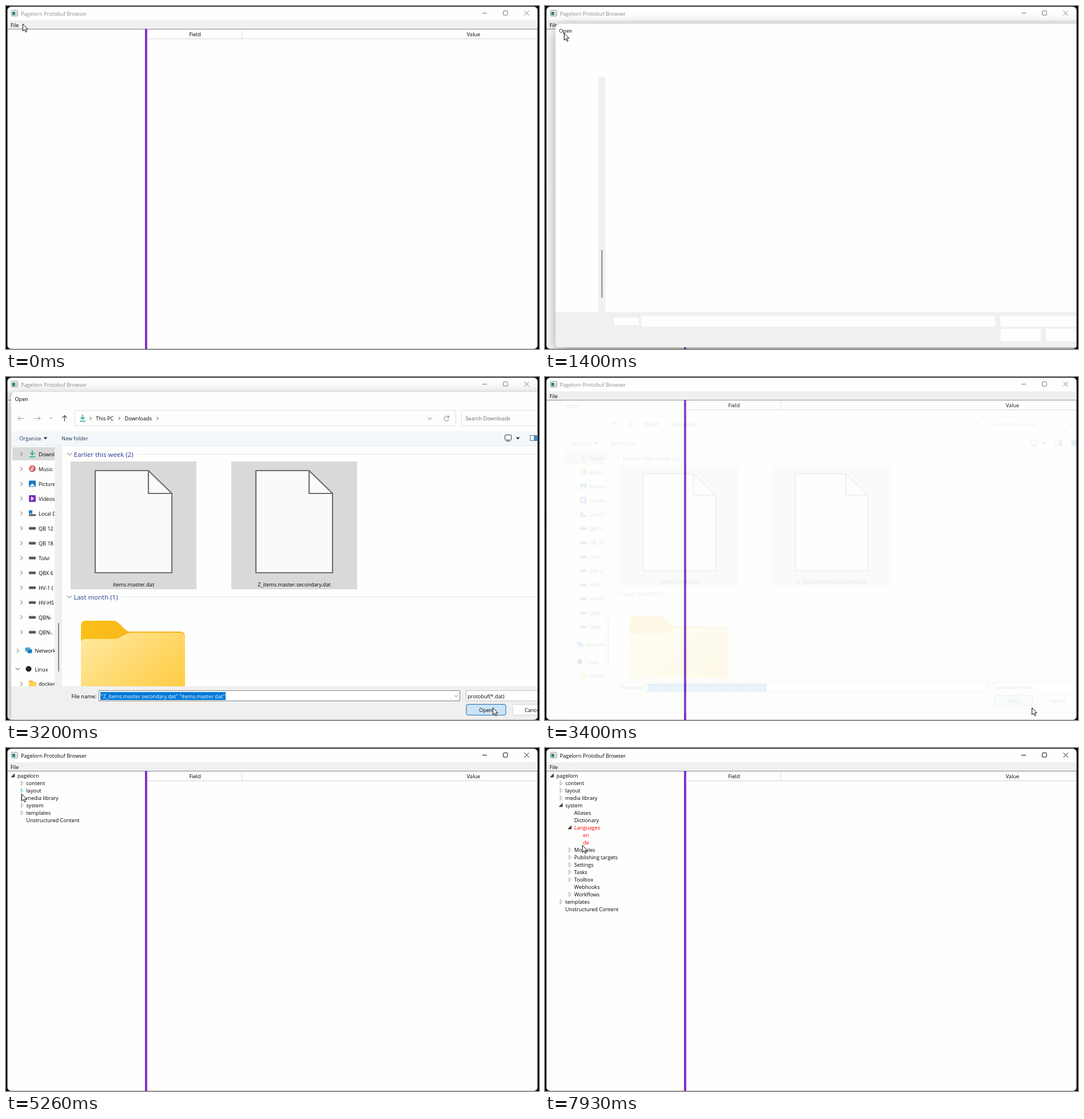
An HTML page with a canvas that plays this animation: 932 px wide and 601 px high, repeating every 8000 ms.

```html
<!DOCTYPE html>
<html lang="en">
<head>
<meta charset="utf-8">
<title>Protobuf Browser</title>
<style>
html, body { margin: 0; width: 932px; height: 601px; overflow: hidden; background: #000; }
canvas { display: block; }
</style>
</head>
<body>
<canvas id="stage" width="932" height="601"></canvas>
<script>
const FPS = 15, TICKS = 120;
const WHITE = '#fefefd', PANEL = '#f0f0f0';
const screen2d = document.getElementById('stage').getContext('2d');
const dialogCanvas = Object.assign(document.createElement('canvas'), { width: 980, height: 620 });
const dialog2d = dialogCanvas.getContext('2d');
let g = screen2d;

// Drawing helpers
function text(str, x, y, { color = '#000', size = 9.15, align = 'left' } = {}) {
  g.font = `${size}px "Open Sans", "Noto Sans", sans-serif`;
  g.textAlign = align;
  g.fillStyle = color;
  g.fillText(str, x, y);
}
function rect(x, y, w, h, fill) {
  g.fillStyle = fill;
  g.fillRect(x, y, w, h);
}
function paint(shape, fill, stroke, width = 1) {
  if (fill) { g.fillStyle = fill; g.fill(shape); }
  if (stroke) { g.strokeStyle = stroke; g.lineWidth = width; g.stroke(shape); }
}
const path = (d, fill, stroke, width) => paint(new Path2D(d), fill, stroke, width);
function box(x, y, w, h, r, fill, stroke) {
  const shape = new Path2D();
  shape.roundRect(x, y, w, h, r);
  paint(shape, fill, stroke);
}
function circle(x, y, r, fill, stroke) {
  const shape = new Path2D();
  shape.arc(x, y, r, 0, 7);
  paint(shape, fill, stroke);
}
function clipped(x, y, w, h, r, draw) {
  g.save();
  g.beginPath();
  g.roundRect(x, y, w, h, r);
  g.clip();
  draw();
  g.restore();
}
function gradient(x0, y0, x1, y1, from, to) {
  const fill = g.createLinearGradient(x0, y0, x1, y1);
  fill.addColorStop(0, from);
  fill.addColorStop(1, to);
  return fill;
}
const chevronRight = (x, y, s = 3.5, color = '#555') =>
  path(`M${x - s / 2} ${y - s}l${s} ${s}l${-s} ${s}`, null, color);
const chevronDown = (x, y, s = 3.5, color = '#666') =>
  path(`M${x - s} ${y - s / 2}l${s} ${s}l${s} ${-s}`, null, color);
const caret = (x, y) => path(`M${x - 3.5} ${y - 1.5}h7l-3.5 4z`, '#333');

// Pointer position: [tick, x, y]
const pointerKeys = [
  [0, 29, 31], [4, 16, 30], [8, 16, 30], [18, 33, 47], [22, 33, 47],
  [25, 230, 262], [27, 230, 262], [29, 480, 300], [31, 650, 497], [39, 845, 577],
  [43, 851, 579], [53, 851, 579], [64, 12, 48], [68, 12, 48], [79, 27, 80],
  [86, 28, 102], [96, 28, 102], [107, 43, 140], [113, 43, 140], [119, 65, 170]
];
function pointerAt(tick) {
  const i = Math.max(1, pointerKeys.findIndex(key => key[0] >= tick));
  const [t0, x0, y0] = pointerKeys[i - 1], [t1, x1, y1] = pointerKeys[i];
  const p = (tick - t0) / (t1 - t0), e = p * p * (3 - 2 * p);
  return { x: Math.round(x0 + (x1 - x0) * e), y: Math.round(y0 + (y1 - y0) * e) };
}
function drawPointer({ x, y }) {
  path(`M${x + .5} ${y + .5}v12.4l2.9-2.7l1.9 4.6l2-.9l-1.9-4.3h3.7z`, '#fff', '#111');
}

// Tree: opensAt is the tick at which a branch unfolds; leaves have none
const node = (name, opensAt, kids = [], color = '#000') => ({ name, opensAt, kids, color });
const leaf = (name, color) => node(name, undefined, [], color);
const shut = name => node(name, Infinity);
const tree = node('pagelorn', 66, [
  shut('content'), shut('layout'), shut('media library'),
  node('system', 92, [
    leaf('Aliases'), leaf('Dictionary'),
    node('Languages', 108, [leaf('en', 'red'), leaf('de', 'red')], 'red'),
    shut('Modules'), shut('Publishing targets'), shut('Settings'), shut('Tasks'),
    shut('Toolbox'), leaf('Webhooks'), shut('Workflows')
  ]),
  shut('templates'), leaf('Unstructured Content')
]);
function drawTree(item, tick, pointer, depth = 0, row = 0) {
  const x = 12 + 15.5 * depth, y = 48.5 + 13 * row;
  const open = tick >= item.opensAt;
  const hover = Math.floor((pointer.y - 42) / 13) === row && Math.abs(pointer.x - x) < 7;
  if (open) path(`M${x - 3} ${y + 2.5}h6v-6z`, hover ? '#82dffb' : '#444', hover ? '#1cc4f7' : '#262626', .6);
  else if (item.opensAt) path(`M${x - 1} ${y - 3.8}l3.6 3.8l-3.6 3.8z`, '#fff', hover ? '#27b7e7' : '#999', .9);
  text(item.name, x + 8, y + 3.5, { color: item.color });
  row++;
  if (open) for (const kid of item.kids) row = drawTree(kid, tick, pointer, depth + 1, row);
  return row;
}

function drawWindow(tick, pointer) {
  rect(2, 0, 928, 601, WHITE);
  const active = tick >= 52;
  const ink = active ? '#000' : '#8c8c8c', buttonInk = active ? '#111' : '#777';
  box(9.5, 7.5, 11, 10, 1, '#f4f6f6', '#8a9094');
  rect(11, 10, 5, 6, '#2f8580');
  rect(17, 10, 2, 6, '#c9cdd0');
  text('Pagelorn Protobuf Browser', 26, 16.5, { color: ink });
  path('M833 12.5h8', null, buttonInk);
  box(869.5, 8.5, 7.5, 7.5, 1, null, buttonInk);
  path('M906.5 8.5l8 8m0-8l-8 8', null, buttonInk);

  rect(2, 25, 928, 15, PANEL);
  const menuOpen = tick >= 6 && tick < 19;
  if (menuOpen || (tick >= 2 && tick < 6)) box(3.5, 25.5, 23, 14, 0, '#c4e1f0', '#26a0da');
  text('File', 8, 36.5);
  rect(2, 40, 928, 1, '#828790');

  rect(243, 40, 4, 561, '#8a2be2');
  rect(243, 40, 1, 561, '#7030b0');
  rect(246, 40, 1, 561, '#7447a8');
  rect(248, 57, 680, 1, '#d3d3e2');
  rect(412, 42, 1, 15, '#dcdce2');
  rect(928, 41, 1, 560, '#c8cacd');
  text('Field', 330.5, 53, { align: 'center' });
  text('Value', 817.5, 53, { align: 'center' });

  if (tick >= 54) drawTree(tree, tick, pointer);
  if (menuOpen) {
    box(3.5, 40.5, 84, 22, 0, PANEL, '#999');
    if (pointer.y > 41) box(5.5, 42.5, 80, 18, 0, '#cfe6f2', '#26a0da');
    text('Open', 32, 55);
  }
}

// Dialog parts
function downloadIcon(x, y) {
  path(`M${x} ${y - 6}v8m-3.5-3.5l3.5 3.5l3.5-3.5M${x - 5} ${y + 5.5}h10`, null, '#16a58c', 1.5);
}
const icons = {
  download: downloadIcon,
  music(x, y) {
    circle(x, y, 6, gradient(x - 5, y - 5, x + 5, y + 5, '#ef8a5b', '#b5578f'));
    path(`M${x} ${y + 2}v-5l2 1.5`, null, '#fff');
    circle(x - 1, y + 2, 1.4, '#fff');
  },
  picture(x, y) {
    box(x - 6, y - 5, 12, 11, 1.5, '#1879c9');
    path(`M${x - 5} ${y + 5}l5-5l5 5z`, '#fff');
  },
  video(x, y) {
    box(x - 6, y - 5.5, 12, 12, 1.5, '#7d32b8');
    path(`M${x - 2} ${y - 3}l5 3.5l-5 3.5z`, '#fff');
  },
  disk(x, y) {
    rect(x - 6, y - 5, 6, 6, '#1683d0');
    rect(x - 6, y + 2, 12, 3, '#555');
  },
  drive(x, y) {
    box(x - 6, y - 1.5, 12, 4.5, 1, '#555');
    rect(x - 5, y - 2, 10, 1, '#999');
  },
  network(x, y) {
    box(x - 6, y - 5, 9, 7, 1, '#3ba3d8');
    box(x - 2, y - 2, 8, 7, 1, '#1976b5', '#8fd1f0');
  },
  linux(x, y) { circle(x, y, 5, '#222'); },
  folder(x, y) {
    box(x - 6, y - 5, 7, 5, 1, '#e9a917');
    box(x - 6, y - 3, 13, 9, 1, '#ffd359');
  }
};
const places = [
  ['Downloads', 'download'], ['Music', 'music'], ['Pictures', 'picture'], ['Videos', 'video'],
  ['Local Disk', 'disk'],
  ...['QB 12', 'QB 18', 'Tolvi', 'QBX 6', 'HV-1 (', 'HV-HS', 'QBN-', 'QBN-.'].map(name => [name, 'drive'])
];
function drawPlace(name, icon, y, indent = 0, open = false) {
  if (open) chevronDown(27 - indent, y, 3.5, '#222');
  else chevronRight(27 - indent, y + .5);
  icons[icon](46 - indent, y);
  text(name, 57 - indent, y + 4);
}
function drawSidebar() {
  rect(11, 123, 74, 23, '#d9d9d9');
  clipped(10, 121, 75, 421, 0, () => {
    places.forEach(([name, icon], i) => drawPlace(name, icon, 134.5 + 26 * i));
    drawPlace('Network', 'network', 479, 6.5);
    drawPlace('Linux', 'linux', 511.5, 6.5, true);
    drawPlace('docker-desktop', 'folder', 537);
  });
}
function drawGroup(name, y, lineX) {
  chevronDown(111, y, 4);
  text(name, 118.5, y + 4.5, { color: '#1e3c91', size: 11.5 });
  rect(lineX, y, 980, 1, '#e4e4ea');
}
function drawFile(name, x, fill, border) {
  if (fill) box(x + .5, 148.5, 219, 223, 0, fill, border || fill);
  path(`M${x + 43} 164h93l41 40v139h-134z`, '#fafafa', '#6f6f6b', 2.2);
  path(`M${x + 136} 164v40h41`, null, '#6f6f6b', 2.2);
  text(name, x + 110, 367, { align: 'center' });
}
function drawFolder() {
  clipped(100, 400, 700, 142, 0, () => {
    path('M131 560V436q0-9 9-9h46q7 0 12 5l10 10q4 4 9 4h87q9 0 9 9v105z',
      gradient(131, 427, 313, 470, '#fcbf18', '#f3b01c'));
    path('M131 560V466q0-7 7-7h50q8 0 13-4l8-4q5-3 11-3h84q9 0 9 9v103z',
      gradient(150, 450, 270, 590, '#ffe79b', '#ffca3e'));
  });
}
function drawToolbars() {
  for (const [x, dir] of [[26, -1], [55, 1]])
    path(`M${x - 5} 72.5h10M${x + 5 * dir - 4 * dir} 68.5l${4 * dir} 4l${-4 * dir} 4`, null, '#999');
  chevronDown(79, 72, 2.5, '#888');
  path('M102.5 77.5v-10m-4 4l4-4l4 4', null, '#444', 1.2);
  box(120.5, 58.5, 666, 27, 0, null, '#e0e0e0');
  downloadIcon(134, 72);
  for (const x of [148, 198, 265]) chevronRight(x, 72.5, 2.5, '#333');
  text('This PC', 157, 76);
  text('Downloads', 207.5, 76);
  chevronDown(741, 73);
  path('M774 70.5a4.3 4.3 0 1 0 .5 3.5M774.5 67.5v3.5h-3.5', null, '#777');
  box(796.5, 58.5, 160, 27, 0, null, '#e0e0e0');
  text('Search Downloads', 803.5, 76, { color: '#666' });
  circle(945, 71, 3, null, '#666');
  path('M943 73.5l-3 3', null, '#666');

  rect(9, 95, 960, 26, '#f4f7fa');
  rect(9, 120, 960, 1, '#e8ebee');
  text('Organize', 23.5, 111, { color: '#1e395b' });
  caret(69, 107);
  text('New folder', 97, 111, { color: '#1e395b' });
  box(872.5, 101.5, 11, 9, 1, '#fff', '#333');
  rect(875, 112, 6, 1, '#333');
  caret(895, 107);
  box(916.5, 102.5, 12, 9, 0, '#fff', '#55789a');
  rect(923, 103, 5, 8, '#2f8fd8');
  circle(951, 107, 6, '#1c7fd6');
}
function drawFooter(tick) {
  const names = '"Z_items.master.secondary.dat" "items.master.dat"';
  text('File name:', 158, 562.5, { align: 'right' });
  box(162.5, 549.5, 631, 18, 0, '#fff', '#858585');
  chevronDown(787, 559, 3);
  const focused = tick >= 46;
  if (tick >= 29) {
    text(names, 166, 562.5);
    if (focused) {
      rect(165, 552, g.measureText(names).width + 2, 14, '#0078d7');
      text(names, 166, 562.5, { color: '#fff' });
    }
  } else if (tick >= 27) text('items.master.dat', 166, 562.5);
  box(804.5, 549.5, 150, 18, 0, '#fff', '#c4c4c4');
  text('protobuf(*.dat)', 807, 562.5);
  const fill = focused ? '#cce4f7' : tick >= 39 ? '#e2effa' : '#fdfdfd';
  box(805, 573.5, 69, 19, 3, fill, focused ? '#1d6cae' : '#0078d4');
  text('Open', 839, 586.5, { align: 'center' });
  box(886, 573.5, 69, 19, 3, '#fdfdfd', '#d0d0d0');
  text('Cancel', 921, 586.5, { align: 'center' });
}
function drawDialog(tick) {
  g = dialog2d;
  g.clearRect(0, 0, 980, 620);
  clipped(9, 26, 957, 579, 7, () => {
    rect(9, 26, 957, 579, WHITE);
    rect(9, 542, 957, 63, PANEL);
    rect(85, 121, 13, 421, PANEL);
    rect(91, 431, 2, 85, '#858585');
    text('Open', 15.5, 41.5);
    if (tick < 23) {
      for (const [x, y, w, h] of [[114, 552, 44, 13], [162, 549, 632, 19], [804, 549, 150, 19],
        [804, 572, 72, 22], [885, 572, 72, 22]]) rect(x, y, w, h, WHITE);
      return;
    }
    drawToolbars();
    drawSidebar();
    const selected = tick >= 46 ? '#d9d9d9' : '#cce8ff';
    drawGroup('Earlier this week (2)', 135, 230);
    drawFile('items.master.dat', 113, tick >= 27 ? selected : tick >= 25 && '#e5f3ff', tick < 29 && '#99d1ff');
    drawFile('Z_items.master.secondary.dat', 394, tick >= 29 && selected, tick < 46 && '#99d1ff');
    drawGroup('Last month (1)', 385, 202);
    drawFolder();
    drawFooter(tick);
  });
  g = screen2d;
}
function showDialog(tick) {
  let scale = 1, alpha = 1;
  if (tick < 23) {
    scale = 1 - .021 * 3 ** (21 - tick);
    if (tick === 20) alpha = .5;
  } else if (tick > 49) {
    scale = 1 - .026 * (tick - 49);
    alpha = 1 - .45 * (tick - 49);
  }
  drawDialog(tick);
  g.save();
  g.globalAlpha = alpha;
  // A shadow would show through a translucent dialog.
  if (alpha === 1) {
    g.shadowColor = 'rgba(0,0,0,.4)';
    g.shadowBlur = 26;
    g.shadowOffsetY = 8;
  }
  g.translate(450 * (1 - scale), 270 * (1 - scale));
  g.scale(scale, scale);
  g.drawImage(dialogCanvas, 0, 0);
  g.restore();
}

function draw(tick) {
  const pointer = pointerAt(tick);
  rect(0, 0, 932, 601, '#000');
  for (let y = 190; y < 390; y += 15) rect(0, y, 2, 1, '#2c2c2c');
  clipped(2, 1, 928, 600, 7, () => {
    drawWindow(tick, pointer);
    if (tick >= 20 && tick < 52) showDialog(tick);
  });
  box(2.5, 1, 927, 600, 7, null, 'rgba(60,60,60,.6)');
  drawPointer(pointer);
}

function frame(now) {
  draw(Math.floor((now + 7) * FPS / 1000) % TICKS);
  requestAnimationFrame(frame);
}
requestAnimationFrame(frame);
</script>
</body>
</html>
```
